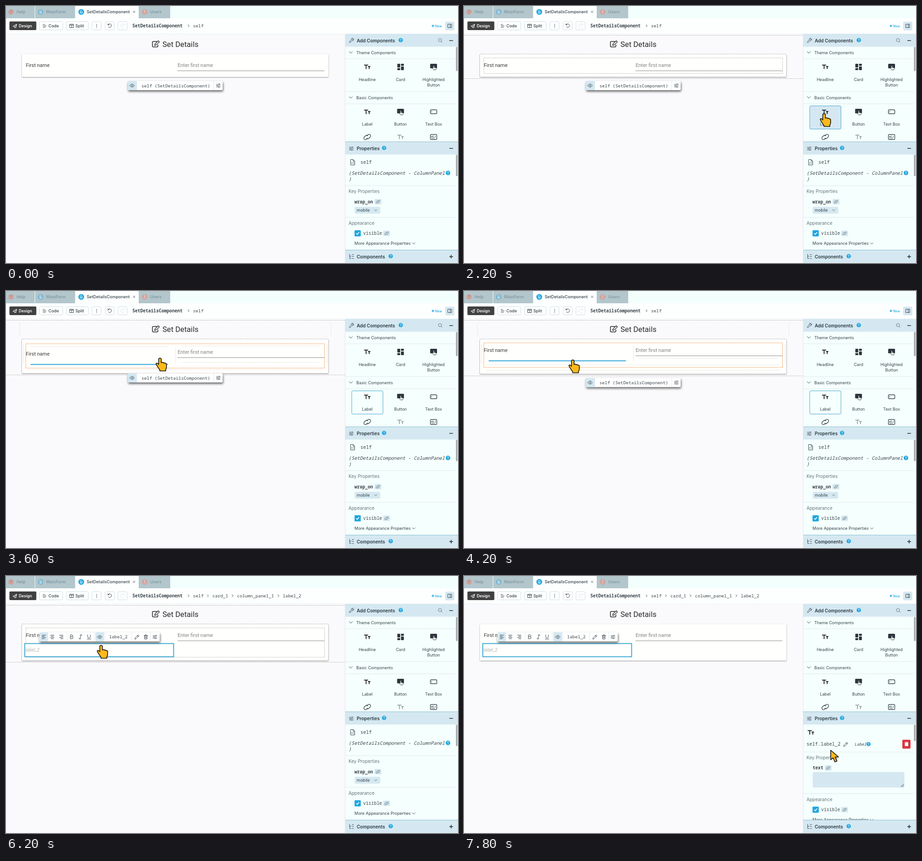
An HTML page for the animation above (8000 ms loop, 991 px wide and 565 px high).

```html
<!DOCTYPE html>
<html lang="en">
<head>
<meta charset="utf-8">
<title>Form designer</title>
<style>
html, body { margin: 0; width: 100%; height: 100%; overflow: hidden; background: #fafafc; }
svg { display: block; width: 991px; height: 565px; }
text { font: 9.05px Inter, sans-serif; fill: #37444b; white-space: pre; }
.mid { text-anchor: middle; }
.med { font-weight: 500; }
.head { font-size: 10px; font-weight: 600; fill: #2b3a42; }
.sec { font-size: 9.9px; fill: #66757d; }
.tab { fill: #7d959f; font-weight: 500; }
.on { font-size: 8.6px; font-weight: 600; fill: #fff; }
.new { font-size: 6.9px; font-weight: 500; fill: #1ea7e1; }
.mono { font: 9.66px "Noto Sans Mono", "DejaVu Sans Mono", monospace; fill: #3b454b; }
.m5 { font-weight: 500; }
.m6 { font-weight: 600; }
.big { font-size: 10.35px; }
.prop { font-size: 9.9px; font-weight: 500; }
.type { font-size: 8.8px; }
.it { font-style: italic; }
.rob { font: 11px Roboto, sans-serif; fill: #3a3a3a; }
.ph { fill: #828282; }
.empty { font-size: 10px; font-style: italic; fill: #b3b3b3; }
.title { font-size: 16.6px; fill: #2a2a2a; }
.ic { fill: none; stroke: #3b474e; stroke-width: 1; stroke-linecap: round; stroke-linejoin: round; }
.thin { stroke-width: .8; }
.bold { stroke-width: 1.4; }
.solid { fill: #2c363c; }
.card { filter: drop-shadow(0 1px 1px rgba(0,0,0,.42)); }
.bar { filter: drop-shadow(1px 3px 2.5px rgba(0,0,0,.6)); }
.dash { fill: none; stroke: #b8b8b8; stroke-dasharray: 2.5 1.5; }
.hot { stroke: #f0a05c; stroke-dasharray: 2.5 .8; }
.cur { fill: #fdb91a; stroke: #111; stroke-width: 1.6; stroke-linejoin: round; }
</style>
</head>
<body>
<svg id="stage" viewBox="0 0 991 565">
<defs>
  <g id="tt"><path d="M-7-4.2H2M-2.5-4.2V4.5M1.5-1H7M4.3-1V4.5" fill="none" stroke="currentColor" stroke-width="1.6"/></g>
  <g id="cards" class="solid"><rect x="-7" y="-7" width="6.3" height="8" rx="1"/><rect x="1" y="-7" width="6.3" height="4.5" rx="1"/><rect x="-7" y="2.5" width="6.3" height="4.5" rx="1"/><rect x="1" y="-1" width="6.3" height="8" rx="1"/></g>
  <g id="btn"><rect class="solid" x="-7.5" y="-7" width="15" height="10" rx="1.5"/><path d="M0 6.5-3 2.8l1-1 1.4 1V-2a1.1 1.1 0 0 1 2.2 0V1l4 .9V4.5L4.8 6.5z" fill="#f5fffd" stroke="#2c363c" stroke-width=".9" stroke-linejoin="round"/></g>
  <g id="box" class="ic bold"><rect x="-7" y="-4.2" width="14" height="8.4" rx="1.5"/><path d="M-4.3-1.3v2.6" stroke-width="1"/></g>
  <g id="abc" class="ic"><rect x="-7" y="-5.5" width="14" height="11" rx="1.5" stroke-width="1.3"/><path class="thin" d="M-4.5-1.5h2v2h-2zM-1-3v3.5h2M3-1.5h1.5M3 .5h1.5M-4.5 3h7"/></g>
  <g id="link" class="ic"><path d="M-.5-2 1-3.4a2.4 2.4 0 0 1 3.6 3.4L2.6 2A2.4 2.4 0 0 1-.8 2M.5 2-1 3.4A2.4 2.4 0 0 1-4.6 0L-2.6-2A2.4 2.4 0 0 1 .8-2"/></g>
  <g id="chip"><rect x="-7.5" y="-6" width="15" height="12" rx="2" fill="#d5e8f1"/><use href="#link" transform="scale(.75)"/></g>
  <g id="help"><circle r="5" fill="#1ea7e1"/><path d="M-1.4-1.2a1.5 1.5 0 1 1 2.2 1.3Q0 .5 0 1.2M0 2.6v.3" fill="none" stroke="#fff" stroke-linecap="round"/></g>
  <g id="down" class="ic"><path d="M-3.5-1.7 0 1.7 3.5-1.7"/></g>
  <g id="eye" class="ic thin"><path d="M-5.3 0Q0-7.4 5.3 0 0 7.4-5.3 0z"/><circle r="1.8"/></g>
  <g id="sliders" class="ic thin"><path d="M-4.5-3h5M3-3h1.5M-4.5 0h1.5M-1 0h5.5M-4.5 3h4.5M2 3h2.5"/><circle cx="1.8" cy="-3" r="1"/><circle cx="-2" r="1"/><circle cx="1" cy="3" r="1"/></g>
  <g id="pencil" class="ic"><path d="M-4.5 4.5-3.6 1.5 2.5-4.5 4.5-2.5-1.6 3.6zM1-3l2 2"/></g>
  <g id="trash" class="ic"><path d="M-4-3h8M-1.4-3v-1.5h2.8V-3M-3-3l.4 7.5h5.2L3-3M-1-.8v3M1-.8v3"/></g>
  <g id="doc"><path d="M-2-3H.8L2.2-1.5V3H-2zM-.8 0H1M-.8 1.5H1" fill="none" stroke="#fff" stroke-width=".8"/></g>
  <g id="tick"><rect x="-6.8" y="-6.8" width="13.6" height="13.6" rx="1.5" fill="#1ea7e1"/><path d="M-3 0-1 2.2 3.2-2.4" fill="none" stroke="#fff" stroke-width="1.6"/></g>
  <path id="hand" class="cur" d="M-3.4 2.4a2.9 2.9 0 0 1 5.8 0v7.4c1-1.6 4-1.4 4.6.4 1-1 3.4-.7 3.8 1 1.4-.7 3 .2 3 2v6c0 3-1.4 4.2-1.6 6v2.6h-13v-2.6c-2-2-3.6-4.6-5.6-8-1.6-2.6-3-4.2-2.4-5.6.8-1.6 3.2-1 4.6 1l.8 1z"/>
  <path id="arrow" class="cur" d="M0 0v21l5.2-4.4 4 9.2 4.6-2-4.2-8.6 7.6-.4z"/>
</defs>
<g id="canvas"></g><g id="chrome"></g><g id="props"></g><g id="foot"></g><g id="pointer"></g>
</svg>
<script>
const $ = id => document.getElementById(id);
const text = (x, y, s, cls = '') => `<text x="${x}" y="${y}" class="${cls}">${s}</text>`;
const rect = (x, y, w, h, fill, more = '') => `<rect x="${x}" y="${y}" width="${w}" height="${h}" fill="${fill}" ${more}/>`;
const line = (x1, y1, x2, y2, c = '#dfe9ec', w = 1) => `<path d="M${x1} ${y1}L${x2} ${y2}" stroke="${c}" stroke-width="${w}" fill="none"/>`;
const icon = (id, x, y, s = 1, more = '') => `<use href="#${id}" transform="translate(${x} ${y}) scale(${s})" ${more}/>`;
const path = (d, more = 'class="ic"') => `<path d="${d}" ${more}/>`;
const dot = (x, y, r, c) => `<circle cx="${x}" cy="${y}" r="${r}" fill="${c}"/>`;
const PALE = '#d5e8f1', MINT = '#f5fffd', BLUE = '#1ea7e1', EDGE = '#8cc1d2', BAR = '#fdfffe';

function panelHead(y, name, helpX, open, edge = EDGE) {
  return rect(744, y, 247, 28, PALE) + line(744, y, 991, y, edge) +
    text(769, y + 18, name, 'head') + icon('help', helpX, y + 13.5, .95) +
    path(`M972 ${y + 14.5}h8${open ? '' : `M976 ${y + 10.5}v8`}`, 'stroke="#222" stroke-width="1.4"');
}

function tabs() {
  const off = '#b2c6cc';
  return rect(0, 0, 991, 27, '#f3fffc') +
    rect(0, 0, 63, 27, off) + rect(64, 0, 87.5, 27, off) + rect(152, 0, 139, 27, BAR) + rect(291, 0, 69, 27, off) +
    dot(11, 13, 6, '#d3a19b') + text(8.9, 16, '?', 'tab') + text(23, 16, 'Help', 'tab') +
    dot(76, 13, 6, '#78b4cf') + icon('doc', 76, 13) + text(88, 16, 'MainForm', 'tab') +
    dot(165, 13, 6.3, BLUE) + icon('doc', 165, 13) + text(177, 16, 'SetDetailsComponent', 'med') +
    path('M278.5 10.5l4.5 4.5m0-4.5l-4.5 4.5', 'stroke="#5c6b72"') +
    dot(304, 13, 6, '#d3a19b') + path('M301.5 16.5q2.5-4 5 0M302.7 11a1.3 1.3 0 1 1 2.6 0 1.3 1.3 0 1 1-2.6 0', 'fill="none" stroke="#eedbd8"') +
    text(316, 16, 'Users', 'tab');
}

function tools() {
  const button = (x, w) => rect(x + .5, 34.5, w - 1, 18, '#fff', 'rx="2" stroke="#cfdfe6"');
  return rect(0, 27, 991, 34.5, BAR) + line(0, 61.5, 743, 61.5, '#edf0f2') +
    rect(7.5, 34, 59, 19, '#414141', 'rx="2"') +
    path('M15 44.5l8.5-4.5-1.8 8-2.7-2.2zM23.5 40l-4.5 5.8v2.6', 'fill="none" stroke="#fff"') +
    text(28, 46.7, 'Design', 'on') +
    button(73, 52) + path('M81 40.5h4M81 43.5h7M81 46.5h6') + text(93, 46.7, 'Code', 'med') +
    button(132, 49) + path('M140 40h8v7.5h-8zM140 42h8M144 42v5.5') + text(152, 46.7, 'Split', 'med') +
    button(188, 21) + [40.5, 43.5, 46.5].map(y => dot(198.7, y, .8, '#222')).join('') +
    button(217, 21) + path('M223.5 41.5v-2.5M223.5 41.5h2.5M223.8 41.2a4 4 0 1 1 .5 4.6') +
    button(245, 21) + path('M259.5 41.5v-2.5M259.5 41.5h-2.5M259.2 41.2a4 4 0 1 0-.5 4.6', 'fill="none" stroke="#dbe6ea"') +
    text(277, 46.7, 'SetDetailsComponent', 'mono m6') +
    path('M936 40l1 2.7 2.7 1-2.7 1-1 2.7-1-2.7-2.7-1 2.7-1z', `fill="${BLUE}"`) +
    text(941, 46.5, 'New', 'new') +
    rect(963, 34.5, 20, 19, PALE, 'rx="2"') + path('M969 40h8v7.5h-8zM974 40v7.5');
}

function palette() {
  const cols = [792, 865, 937.5];
  const label = (i, y, s) => text(cols[i], y, s, 'mid');
  return icon('down', 756, 102) + text(768, 105.5, 'Theme Components') + line(744, 116, 986, 116) +
    icon('tt', 792, 134) + icon('cards', 865, 134) + icon('btn', 937.5, 134) +
    label(0, 165, 'Headline') + label(1, 165, 'Card') + label(2, 165, 'Highlighted') + label(2, 177, 'Button') +
    line(744, 188, 986, 188) + icon('down', 756, 201) + text(768, 204.5, 'Basic Components') + line(744, 215, 986, 215) +
    icon('tt', 792, 233) + icon('btn', 865, 233) + icon('box', 937.5, 232.5) +
    label(0, 263, 'Label') + label(1, 263, 'Button') + label(2, 263, 'Text Box') +
    icon('link', 792, 288, 1.4) + icon('tt', 865, 288, 1, 'color="#8b969b"') + icon('abc', 937.5, 288);
}

function chrome(s) {
  const crumb = ['self', ...(s.picked ? ['card_1', 'column_panel_1', 'label_2'] : [])];
  let x = 410, trail = '';
  for (const c of crumb) {
    trail += path(`M${x - 10.8} 41l2.3 2.4-2.3 2.4`) + text(x, 46.7, c, 'mono');
    x += c.length * 5.8 + 19.2;
  }
  const tile = s.tile ? rect(758, 219.5, 68.5, 51, s.tile > 1 ? PALE : MINT, 'rx="2.5" stroke="#45a9d2"') : '';
  return tabs() + tools() + trail +
    rect(743, 61.5, 248, 504, MINT) + line(743.5, 62, 743.5, 565, '#dce8ec') +
    tile + palette() + rect(986.5, 90, 3.5, 53, '#a3abaf', 'rx="1.5"') +
    panelHead(61.5, 'Add Components', 865.5, true, PALE) +
    path('M752.5 79l4.5-4.5a3 3 0 0 1 3.8-3.6l-1.8 1.9 1.5 1.5 1.8-1.8a3 3 0 0 1-3.6 3.7L754.2 80.7z') +
    path('M954 77.7l2.5 2.5M955 75a3.5 3.5 0 1 0-7 0 3.5 3.5 0 1 0 7 0', 'fill="none" stroke="#66757d"');
}

const propsTail = y => text(751, y + 3, 'Appearance', 'sec') + icon('tick', 771, y + 21.8) +
  text(783, y + 25, 'visible', 'mono prop') + icon('chip', 834.5, y + 21.8) +
  text(764, y + 47, 'More Appearance Properties') + icon('down', 894, y + 44, .9);

function selfProps() {
  return path('M756 337.5h5l3.5 3.5v8.5H756zM761 337.5v3.5h3.5M759 343.5l-1.2 1.5 1.2 1.5M761.5 343.5l1.2 1.5-1.2 1.5') +
    text(777, 347, 'self', 'mono big') +
    text(751, 370.5, '(SetDetailsComponent - ColumnPanel', 'mono big it') + icon('help', 969, 367) +
    text(751, 384, ')', 'mono big it') + line(744, 395, 986, 395) +
    text(751, 411.3, 'Key Properties', 'sec') + text(764, 433.8, 'wrap_on', 'mono m6') + icon('chip', 815.5, 430.3) +
    rect(764.5, 441.5, 56, 15, PALE, 'rx="2"') + text(769, 451.8, 'mobile') + icon('down', 810.5, 449, .8) +
    line(744, 464.5, 986, 464.5) + propsTail(478) + rect(986.5, 327, 3.5, 47, '#a3abaf', 'rx="1.5"');
}

function labelProps() {
  return icon('tt', 760.5, 344) + text(751, 373, 'self.label_2', 'mono big') + icon('pencil', 837, 370) +
    text(856, 372.8, 'Label', 'mono type it') + icon('help', 887, 369.5, .9) +
    rect(961, 360, 18, 19.5, '#dc3640', 'rx="2"') +
    path('M967 367h6.4v6.5H967zM966.2 365.8h8M968.8 365h2.8', 'fill="#fff" stroke="#fff" stroke-width=".9"') +
    line(744, 387, 986, 387) + text(751, 403, 'Key Properties', 'sec') +
    text(764.5, 425.3, 'text', 'mono m6') + icon('chip', 798.5, 422) +
    rect(764.5, 431, 201, 34, PALE, 'rx="2"') + path('M958 463.5l6-6M961.5 463.5l2.5-2.5') +
    line(744, 478.5, 986, 478.5) + propsTail(492) + rect(986.5, 327, 3.5, 36, '#a3abaf', 'rx="1.5"');
}

function selfBar(y) {
  return `<g transform="translate(0 ${y})"><g class="bar">${rect(267, -10, 208, 20, '#fff', 'rx="2"')}</g>` +
    rect(267, -10, 20, 20, PALE) + icon('eye', 276.5, 0) + text(297, 3.5, 'self (SetDetailsComponent)', 'mono m5') +
    line(455.5, -10, 455.5, 10) + icon('sliders', 465.5, 0) + '</g>';
}

function labelBar() {
  const align = (x, d) => path([0, 1, 2, 3].map(i => `M${x + (i % 2 ? d : 0)} ${130 + i * 2.6}h${i % 2 ? 5 : 8}`).join(''));
  return `<g class="bar">${rect(73, 124, 264, 20, '#fff', 'rx="2"')}</g>` +
    rect(74, 124, 18, 20, PALE) + rect(196, 124, 19, 20, PALE) +
    [134, 193.5, 217, 275.5, 317].map(x => line(x, 124, x, 144)).join('') +
    align(79, 0) + align(97.5, 1.5) + align(117, 3) +
    path('M141.5 129.5h3a2 2 0 0 1 0 4h-3zM141.5 133.5h3.5a2.2 2.2 0 0 1 0 4.4h-3.5z') +
    path('M162.5 129.5h4M160 138h4M164.8 129.5l-3 8.5') + path('M179 129.5v3.5a3 3 0 0 0 6 0v-3.5M178 138.5h8') +
    icon('eye', 205.5, 134) + text(226, 137.3, 'label_2', 'mono m5') +
    icon('pencil', 287, 134) + icon('trash', 306.5, 134) + icon('sliders', 326.5, 134);
}

function zones(s) {
  const faint = (...a) => line(...a, '#ebe9e7');
  const low = s.shift > 0;
  const { y, wide } = s.drop;
  const rightY = wide ? 153 : low ? 157 : 148.5;
  return faint(30, 69, 30, 100) + faint(712.5, 69, 712.5, 100) + faint(38.5, 117, 38.5, 160) + faint(704, 117, 704, 160) +
    faint(371.5, 119 + s.shift / 2, 371.5, 155 + s.shift / 2) +
    (low ? faint(54, 122, 355, 122) + faint(386, 121, 687, 121) : '') +
    (wide ? faint(54, 148, 355, 148) : faint(48, s.cardB - 8, 693, s.cardB - 8)) +
    faint(386, rightY, 687, rightY) +
    (wide || low ? '' : faint(48, 162.5, 693, 162.5)) +
    line(wide ? 48 : 54, y, wide ? 693 : 355, y, '#2da5d8', 1.8);
}

function canvas(s) {
  let out = rect(0, 61, 744, 504, '#fafafc') + rect(35, 106, 672, s.cardB - 106, '#fffffd', 'class="card" rx="1"');
  out += path('M331 78h-8a2 2 0 0 0-2 2v8a2 2 0 0 0 2 2h8a2 2 0 0 0 2-2v-3', 'fill="none" stroke="#222" stroke-width="1.5"') +
    path('M326 86.5l.8-3.5 7-6.5 2.5 2.6-7 6.6z', 'fill="#fafafc" stroke="#222" stroke-width="1.3"') +
    text(343, 89.5, 'Set Details', 'rob title') +
    text(43.5, 134.3 + s.shift, 'First name', 'rob') + text(376.3, 134.3 + s.shift / 2, 'Enter first name', 'rob ph') +
    line(376, 142.5 + s.shift / 2, 698, 142.5 + s.shift / 2, '#8d8d8d');
  if (s.dash) {
    out += path(`M1 64.5H743M1 ${s.outB}H743`, 'class="dash"') +
      rect(34.5, 105.5, 672.5, s.cardB - 105.5, 'none', 'class="dash" rx="2"') +
      rect(43.5, s.inT, 655, s.inB - s.inT, 'none', `class="dash${s.drop ? ' hot' : ''}"`);
  }
  if (s.drop) out += zones(s);
  if (!s.picked) return out + selfBar(s.barY);
  return out + rect(41.2, 148.5, 326.3, 29, '#fffffd', 'stroke="#2ba3cf" stroke-width="1.8"') +
    text(43, 165.5, 'label_2', 'rob empty') + labelBar();
}

// time, x, y
const track = [[200, 955, 510], [400, 860, 445], [600, 715, 335], [800, 610, 255], [1000, 560, 218], [1200, 548, 208],
  [1400, 610, 216], [1600, 735, 233], [1800, 790, 237], [2200, 790, 237], [2400, 735, 272], [2600, 600, 225],
  [2800, 494, 159.5], [3200, 400, 149], [3600, 338, 148], [4000, 260, 151], [4400, 218, 153], [4600, 212, 154],
  [4800, 211, 154], [5400, 209, 153], [7000, 209, 153], [7200, 250, 178], [7400, 450, 262], [7600, 700, 358], [7800, 804, 383]];
// time, card bottom, outer bottom, inner top, inner bottom, bar centre, text shift
const layout = [[0, 156, 159.5, 114, 148.5, 175, 0], [2400, 156, 159.5, 114, 148.5, 175, 0], [2800, 184.5, 190, 114, 168, 179, 0],
  [3200, 184, 189, 114, 168, 186, 0], [3400, 181, 185, 116, 169, 188, 8], [3600, 181, 184.5, 116, 169.5, 191, 8],
  [3800, 182, 186, 114, 168, 196, 0], [4400, 182.5, 187, 114, 168, 204, 0], [4600, 182.5, 187, 114, 168, 207, 0],
  [5200, 182.5, 187, 114, 168, 206, 0], [5400, 182.5, 187, 114, 168, 205, 0], [6000, 182.5, 187, 114, 168, 205, 0],
  [6200, 186, 189.5, 114, 178.5, 205, 0]];

function at(rows, t) {
  const i = rows.findIndex(r => r[0] > t);
  if (i < 0) return rows[rows.length - 1].slice(1);
  if (!i) return rows[0].slice(1);
  const a = rows[i - 1], b = rows[i], k = (t - a[0]) / (b[0] - a[0]);
  return a.slice(1).map((v, j) => v + (b[j + 1] - v) * k);
}

function stateAt(t) {
  const [x, y] = at(track, t);
  const [cardB, outB, inT, inB, barY, shift] = at(layout, t);
  const drag = t >= 2200 && t < 6200, shown = t >= 200;
  const wide = t < 3400;
  const drop = t >= 2600 && t < 6200 && { wide, y: wide ? inB - 4 : shift ? 161.5 : 153.5 };
  return { x, y, cardB, outB, inT, inB, barY, shift, drop, shown,
    hand: t >= 1800 && t < 7200, picked: t >= 6200, label: t >= 6400,
    dash: drag || shown && x < 744 && !(t >= 1600 && t < 2200),
    tile: t >= 1800 && t < 2400 ? 2 : t >= 2400 && t < 6200 ? 1 : 0 };
}

function draw(t) {
  const s = stateAt(t);
  $('canvas').innerHTML = canvas(s);
  $('chrome').innerHTML = chrome(s);
  $('props').innerHTML = rect(744, 298, 247, 240, MINT) + (s.label ? labelProps() : selfProps());
  $('pointer').innerHTML = s.shown ? icon(s.hand ? 'hand' : 'arrow', s.x, s.y) : '';
}

$('foot').innerHTML = panelHead(298.5, 'Properties', 829, true) + icon('sliders', 757, 313.5) +
  panelHead(536.5, 'Components', 843.5, false) +
  path('M753.5 546v9h3M753.5 550h3M759 546.5h3M759 550.5h3M759 555h3');

// the picture advances in steps of 200 ms
const STEP = 200, LOOP = 8000;
const start = performance.now();
let last = -1;
function tick(now) {
  const t = Math.floor(Math.max(0, now - start) % LOOP / STEP) * STEP;
  if (t !== last) draw(last = t);
  requestAnimationFrame(tick);
}
draw(0);
requestAnimationFrame(tick);
</script>
</body>
</html>
```
